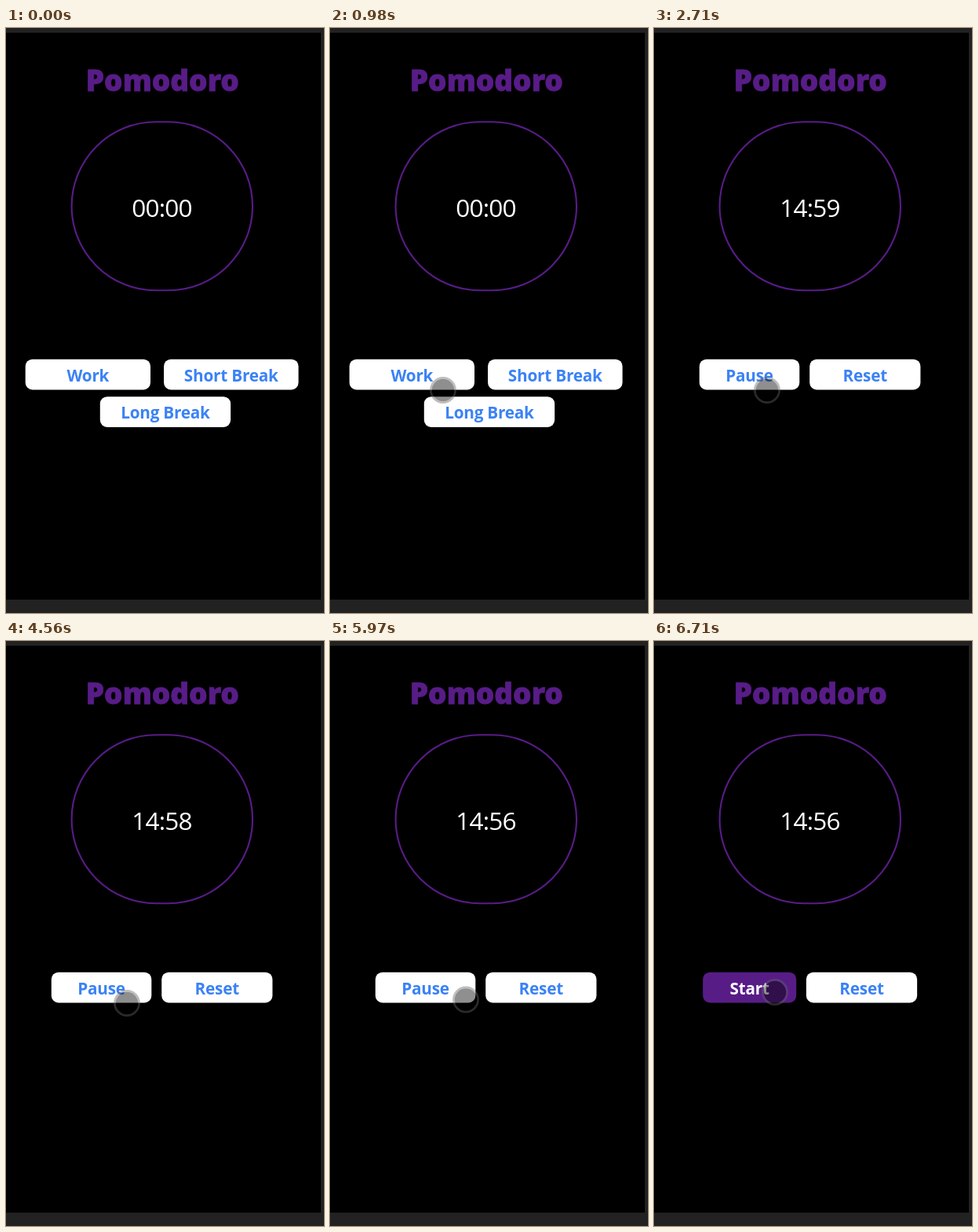
An HTML page that plays this animation: 405 by 743 pixels, repeating every 8000 ms.

```html
<!DOCTYPE html>
<html lang="en">
<head>
<meta charset="utf-8">
<title>Pomodoro</title>
<style>
  html, body { margin: 0; width: 100%; height: 100%; overflow: hidden; background: #222; }
  svg { display: block; width: 100%; height: 100%; }
  text { font-family: "Open Sans", "Noto Sans", sans-serif; text-anchor: middle; }
  .title { font-size: 37px; font-weight: 800; fill: #581c87; stroke: #581c87; stroke-width: .8px; }
  #clock { font-size: 31.5px; font-weight: 450; letter-spacing: -.8px; fill: #fff; }
  .btn rect { fill: #fff; }
  .btn text { font-size: 20.7px; font-weight: 700; letter-spacing: -.2px; fill: #3b82f6; }
  .hot rect { fill: #581c87; }
  .hot text { fill: #fff; }
</style>
</head>
<body>
<svg viewBox="0 0 405 743">
  <rect width="405" height="743" fill="#222"/>
  <rect y="6" width="401" height="720"/>
  <text class="title" x="199.3" y="80">Pomodoro</text>
  <rect x="83.6" y="119.3" width="230.4" height="214" rx="107" fill="none" stroke="#581c87" stroke-width="2.1"/>
  <text id="clock" x="198.5" y="240"></text>
  <g id="buttons"></g>
  <rect id="tap" height="38.8" fill="#33b5e5"/>
  <g id="cursor">
    <circle r="14.3" fill-opacity=".44"/>
    <circle r="15.6" fill="none" stroke="#646464" stroke-opacity=".42" stroke-width="2.7"/>
  </g>
</svg>
<script>
const LOOP = 8000, STEP = 67;
const $ = id => document.getElementById(id);
const show = (el, on) => el.setAttribute('visibility', on ? 'visible' : 'hidden');

// Each button: label, left, top, width
const screens = {
  menu: [['Work', 24.7, 420.7, 159.3], ['Short Break', 201, 420.7, 171.5], ['Long Break', 119.8, 468.2, 166.3]],
  running: [['Pause', 57.8, 420.7, 127.5], ['Reset', 198.2, 420.7, 141.2]],
  paused: [['Start', 62.2, 420.7, 119], ['Reset', 193.9, 420.7, 141.2]]
};

const moves = [
  { at: 440, steps: 9, pos: k => {
    const rest = 1 - k / 8;
    return [144 + 208 * rest ** 4.5, 460 + 270 * rest ** 2.9];
  } },
  { at: 4560, steps: 8, pos: k => {
    const u = k / 7, s = u * u * (3 - 2 * u);
    return [154 + 112 * s, 460 + 5 * u + 7.5 * Math.sin(Math.PI * u)];
  } },
  { at: 5900, steps: 4, pos: k => {
    const rest = 1 - (k + 1) / 4;
    return [154 + 112 * rest ** 2.56, 446 + 19 * rest];
  } }
];

let drawn = '';
function drawButtons(name, hot) {
  if (drawn === name + hot) return;
  drawn = name + hot;
  $('buttons').innerHTML = screens[name].map(([label, x, y, w], i) =>
    `<g class="btn${i === hot ? ' hot' : ''}">
      <rect x="${x}" y="${y}" width="${w}" height="38.8" rx="9"/>
      <text x="${x + w / 2}" y="${y + 28.2}">${label}</text>
    </g>`).join('');
}

function drawTap(name, index, alpha) {
  const [, x, y, w] = screens[name][index];
  const attrs = { x, y, width: w, 'fill-opacity': alpha };
  for (const key in attrs) $('tap').setAttribute(key, attrs[key]);
}

function clockText(t) {
  if (t < 1770) return '00:00';
  const ticks = [2710, 3700, 4690, 5680].filter(at => t >= at).length;
  return ticks ? '14:' + (60 - ticks) : '15:00';
}

function drawCursor(t) {
  const move = moves.filter(m => t >= m.at).pop();
  show($('cursor'), move);
  if (!move) return;
  const k = Math.min(move.steps - 1, Math.floor((t - move.at + 4) / STEP));
  const pressed = (t >= 1450 && t < 1640) || (t >= 6310 && t < 6500);
  $('cursor').setAttribute('transform',
    `translate(${move.pos(k)}) scale(${pressed ? 1.06 : 1})`);
}

function draw(t) {
  const name = t < 1770 ? 'menu' : t < 6570 ? 'running' : 'paused';
  const firstTap = t >= 1640 && t < 1770;
  const secondTap = t >= 6500;
  const hot = firstTap ? 2 : secondTap ? 0 : -1;
  const alpha = firstTap || (secondTap && t < 6640) ? .4 : secondTap && t < 6710 ? .2 : 0;
  drawButtons(name, hot);
  drawTap(name, Math.max(hot, 0), alpha);
  $('clock').textContent = clockText(t);
  drawCursor(t);
}

const start = performance.now();
function frame() {
  draw((performance.now() - start) % LOOP);
  requestAnimationFrame(frame);
}
frame();
</script>
</body>
</html>
```
